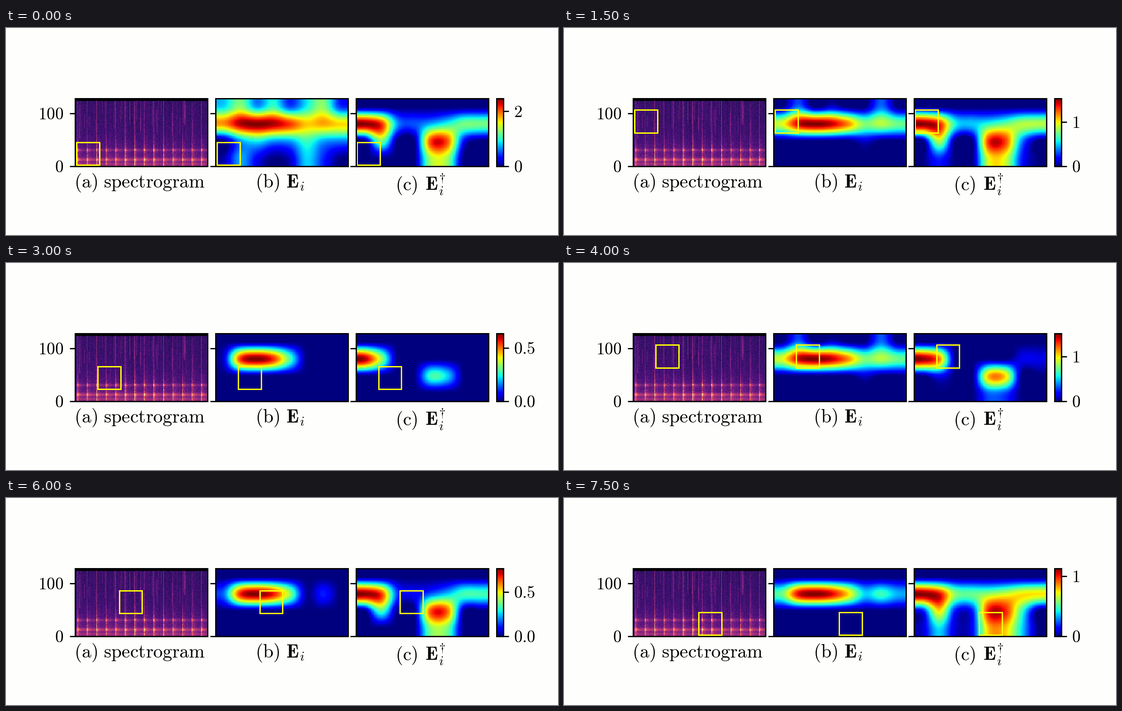
A matplotlib script that plays this animation: 1222x458 px, repeating every 8000 ms.

```python
import numpy as np
import matplotlib.pyplot as plt
from matplotlib.animation import FuncAnimation
from matplotlib.patches import Rectangle

W, H, DPI = 1222, 458, 100
PX = 72 / DPI
TOP, BOTTOM = 156, 306
PANELS = [(153, 446), (464, 757), (774.5, 1068)]
BAR = (1086, 1101)
BINS, STEPS = 128, 250
ROWS, COLS = 4, 8
LABEL, TICK, SUB = 41.7, 37.2, 28.6
BG = "#fefefc"
SWEEP = 5  # window positions per column
FRAMES = 16
PEAK = 2.46

plt.rcParams["mathtext.fontset"] = "cm"


def bump(x, center, width, power=2):
    return np.exp(-np.abs((x - center) / width) ** power)


def cubic(d):
    """Cubic convolution kernel with a = -1/2."""
    d = np.abs(d)
    near = 1.5 * d**3 - 2.5 * d**2 + 1
    far = -.5 * (d**3 - 5 * d**2 + 8 * d - 4)
    return np.where(d <= 1, near, np.where(d < 2, far, 0))


def weights(n_out, n_in):
    """Upsampling matrix; edge cells repeat outwards."""
    pos = (np.arange(n_out) + .5) * n_in / n_out - .5
    cells = np.arange(-2, n_in + 2)
    w = cubic(pos[:, None] - cells)
    return w @ (np.clip(cells, 0, n_in - 1)[:, None] == np.arange(n_in))


UP, ACROSS = weights(BINS, ROWS), weights(STEPS, COLS)


def upsample(grid):
    return UP @ grid @ ACROSS.T


def relevance(grid, level):
    """Keep the top `level` of a coarse map, smooth it and scale it to 1."""
    floor = upsample(grid).max() - level
    out = np.clip(upsample(np.maximum(grid - floor, 0)), 0, None)
    return out / out.max()


def map_b():
    c = np.arange(COLS)
    high = (.12 + .42 * bump(c, .8, 1) + .3 * bump(c, 3, .8)
            + .45 * bump(c, 5.7, .9))
    ridge = (.67 + .27 * bump(c, 2.3, 2.1, 4) + .06 * bump(c, 1.5, 1.5)
             + .06 * bump(c, 6, .6))
    mid = (.25 * np.minimum(c, 1) + .12 * bump(c, 2, .8)
           + .17 * bump(c, 5, .8))
    low = .3 * bump(c, 1.2, .8) + .35 * bump(c, 5.2, .9)
    return np.array([high, ridge, mid, low])


def map_c():
    c = np.arange(COLS)
    ridge = (.48 + .52 * bump(c, 0, 1.6, 4)
             + .19 * np.clip((c - 3) / 3, 0, 1))
    drip = bump(c, 1, .8)
    stalk = .92 * (1 - .07 * (c - 4.5)) * bump(c, 4.7, 1.45, 4)
    return np.array([0 * c, ridge, stalk + .68 * drip,
                     .8 * stalk + .36 * drip])


def glide(*keys):
    """Levels for every step, easing geometrically between (step, level)."""
    steps, levels = zip(*keys)
    return np.exp(np.interp(np.arange(FRAMES), steps, np.log(levels)))


GRID_B, GRID_C = map_b(), map_c()
LEVEL_B = glide((0, PEAK), (1, .806), (2, 1.005), (4, 2.31), (5, .8),
                (6, .636), (8, 1.515), (10, .85), (12, .765), (14, 1.1),
                (15, 1.128))
LEVEL_C = glide((0, .66), (1, .53), (4, .94), (6, .18), (8, .37), (12, .59),
                (15, 1))


def spectrogram():
    rng = np.random.default_rng(7)
    t = np.arange(STEPS)[None, :]
    f = np.arange(BINS)[:, None]
    phase = (t - 4) % 18
    beat = (t + 14) // 18
    grain = rng.random((BINS, STEPS))

    spec = .19 + .2 * np.exp(-f / 30) + .1 * (grain - .5)
    spec += .015 * rng.normal(0, 1, (1, STEPS))

    strength = rng.uniform(.1, .32, 16)[beat]
    spec += np.exp(-phase / .7) * strength * (.6 + .4 * grain)
    spec += .2 * np.exp(-phase / 3) * bump(f, 0, 46, 4) * (.5 + grain)

    spec += bump(f, 12, 2.8) * (.17 + .2 * np.exp(-phase / 5))
    spec += bump(f, 30, 2.4) * (.1 + .24 * np.exp(-phase / 4))
    spec += bump(f, 4, 2) * .09

    # Short vertical streaks between the beats.
    for x in rng.choice(STEPS, 40, replace=False):
        low = rng.integers(50, 100)
        spec[low:low + rng.integers(20, 70), x] += rng.uniform(.06, .17)

    edge = 122 + rng.integers(0, 2, (1, STEPS))
    return np.where(f > edge, 0, np.clip(spec, .05, .95))


fig = plt.figure(figsize=(W / DPI, H / DPI), dpi=DPI, facecolor=BG)
ax = fig.add_axes([0, 0, 1, 1])
ax.axis("off")


def image(data, x0, x1, cmap):
    return ax.imshow(data, extent=(x0, x1, BOTTOM, TOP), cmap=cmap, vmin=0,
                     vmax=1, aspect="auto", interpolation="nearest")


def outline(x, y, w, h, color, z):
    return ax.add_patch(Rectangle((x, y), w, h, fill=False, ec=color,
                                  lw=3 * PX, zorder=z))


def frame(x0, x1):
    outline(x0, TOP, x1 - x0, BOTTOM - TOP, "black", 4)


def tick(x0, x1, y):
    return ax.plot([x0, x1], [y, y], color="black", lw=2.8 * PX, zorder=4,
                   solid_capstyle="butt")[0]


def roman(text):
    return rf"$\mathrm{{{text}}}$"


def write(x, y, tex, size, ha="left"):
    return ax.text(x, y, tex, fontsize=size * PX, color="black", ha=ha,
                   va="baseline")


blank = np.zeros((BINS, STEPS))
image(spectrogram()[::-1], *PANELS[0], "magma")
img_b = image(blank, *PANELS[1], "jet")
img_c = image(blank, *PANELS[2], "jet")
image(np.linspace(1, 0, 256)[:, None], *BAR, "jet")

boxes = []
for x0, x1 in PANELS:
    frame(x0, x1)
    for y in (188.5, BOTTOM):
        tick(x0 - 12.5, x0, y)
    boxes.append(outline(x0, TOP, 50.8, 50.4, "#ffff00", 3))

write(127.5, 201.5, roman(100), TICK, "right")
write(127.5, 319, roman(0), TICK, "right")

frame(*BAR)
tick(BAR[1], 1113, BOTTOM)
bar_tick = tick(BAR[1], 1113, TOP)
bar_zero = write(1123.5, 319, roman(0), TICK)
bar_label = write(1123.5, 201, roman(1), TICK)

write(151, 353, roman("(a)~spectrogram"), LABEL)
write(551.5, 353, roman("(b)"), LABEL)
write(620.5, 353, r"$\mathbf{E}$", LABEL)
write(650.5, 360.5, "$i$", SUB)
write(862.5, 358.5, roman("(c)"), LABEL)
write(927.5, 358.5, r"$\mathbf{E}$", LABEL)
write(958, 340, r"$\dagger$", SUB)
write(957.5, 370, "$i$", SUB)

ax.set_xlim(0, W)
ax.set_ylim(H, 0)


def update(i):
    col, row = divmod(i, SWEEP)
    for box, (x0, _) in zip(boxes, PANELS):
        box.set_xy((x0 + 2.7 + 47.4 * col, 252.6 - 23.8 * row))

    top = LEVEL_B[i]
    img_b.set_data(relevance(GRID_B, top / PEAK))
    img_c.set_data(relevance(GRID_C, LEVEL_C[i]))

    value = int(top) if top >= 1 else .5
    y = BOTTOM - (BOTTOM - TOP) * value / top
    bar_tick.set_ydata([y, y])
    bar_label.set_y(y + 13)
    bar_label.set_text(roman(value))
    bar_zero.set_text(roman(0 if top >= 1 else "0.0"))
    return [*boxes, img_b, img_c, bar_tick, bar_label, bar_zero]


anim = FuncAnimation(fig, update, frames=FRAMES, interval=500, repeat=True,
                     repeat_delay=0)
plt.show()
```
